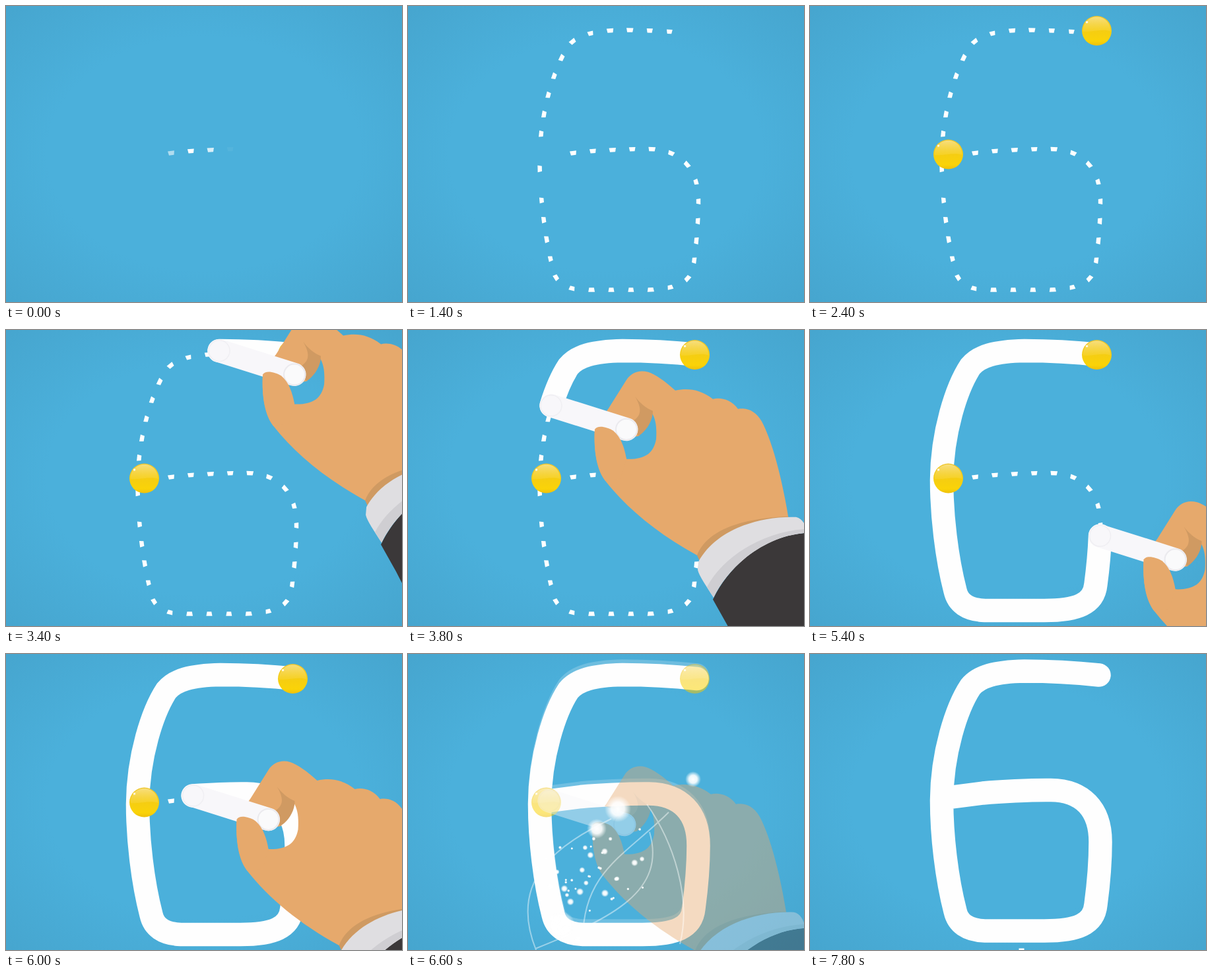
Write an HTML page that moves like this. It is 600 by 449 pixels and loops after 8000 ms.

```html
<!DOCTYPE html>
<html lang="en">
<head>
<meta charset="utf-8">
<title>Drawing the number six</title>
<style>
  html, body { margin: 0; width: 100%; height: 100%; overflow: hidden; background: #4aafd9; }
  svg { display: block; width: 100%; height: 100%; }
</style>
</head>
<body>
<svg viewBox="0 0 600 449" preserveAspectRatio="none">
  <defs>
    <radialGradient id="sky" cx=".5" cy=".5" r=".72">
      <stop offset=".55" stop-color="#4bb0db"/>
      <stop offset="1" stop-color="#46a5ce"/>
    </radialGradient>
    <linearGradient id="gold" x2="0" y2="1">
      <stop offset="0" stop-color="#eec52c"/>
      <stop offset=".5" stop-color="#f5cd12"/>
      <stop offset=".85" stop-color="#fad308"/>
      <stop offset="1" stop-color="#eec00c"/>
    </linearGradient>
    <linearGradient id="shine" x2="0" y2="1">
      <stop offset="0" stop-color="#fff3c0" stop-opacity=".55"/>
      <stop offset="1" stop-color="#fbe26a" stop-opacity=".2"/>
    </linearGradient>
    <radialGradient id="glow">
      <stop offset="0" stop-color="#fff"/>
      <stop offset=".5" stop-color="#fff" stop-opacity=".9"/>
      <stop offset="1" stop-color="#fff" stop-opacity="0"/>
    </radialGradient>
    <path id="six" d="M438 32C400 28 360 26 325 26C280 27 256 34 243 50C222 82 200 150 199.500 222C199.500 275 207 340 220 390C224 408 238 419 265 420L355 420C405 420 430 410 433 380C437 350 440 315 440 285C440 235 412 207 365 206.500C335 206 285 209 262 211L200 219"/>
    <g id="ball">
      <circle r="22.500" fill="url(#gold)"/>
      <path d="M-21 1C-21 -13 -11 -21 0 -21S21 -13 21 1C10 -4 -8 3 -21 1Z" fill="url(#shine)"/>
      <circle cx="-15" cy="-13" r="1.800" fill="#fff" opacity=".8"/>
    </g>
  </defs>

  <rect width="600" height="449" fill="url(#sky)"/>
  <g id="dashes" fill="#fff" transform="translate(0 10.500)"></g>
  <g fill="none" stroke="#fefefe" stroke-width="35.500" stroke-linecap="round" stroke-linejoin="round">
    <use id="finished" href="#six"/>
    <use id="drawn" href="#six" y="5.500"/>
  </g>
  <g id="balls"></g>

  <g id="hand">
    <path fill="#3b3839" d="M462 408C487 355 540 311 602 307L800 330V850H690L485 449Z"/>
    <path fill="#e6a96c" fill-rule="evenodd" d="M283 148C281 190 288 214 299 228C332 270 378 308 438 341L500 345L577 288C568 230 553 170 536 138C526 121 513 117 500 119C490 105 474 101 462 104C443 89 424 87 405 91C390 77 374 66 364 63C350 59 338 64 331 75L304 118ZM331 195C358 196 372 187 376 165C377 148 376 135 369 124L350 160L322 165Z"/>
    <path fill="#d09a62" d="M344 100C350 109 361 118 371 122C371 140 358 155 349 160L336 140C352 132 357 122 344 100Z"/>
    <path fill="#cf9a62" d="M438 341C452 305 500 285 576 282L580 292L500 306L443 352Z"/>
    <path fill="#dfdee1" d="M440 351C466 303 530 281 588 283C597 285 603 294 605 307C548 310 490 350 463 405C452 388 441 372 439 363Z"/>
    <path fill="#cfced2" d="M453 389C478 342 540 304 604 301L605 307C548 310 490 350 463 405Z"/>
    <path d="M217 114L331 150" stroke="#f8f7fa" stroke-width="35" stroke-linecap="round"/>
    <circle cx="217" cy="114" r="16" fill="none" stroke="#f0eff3" stroke-width="1.500"/>
    <circle cx="331" cy="150" r="16" fill="#fafafb" stroke="#ebeaee" stroke-width="2"/>
    <path fill="#e6a96c" d="M283 150C287 143 301 146 311 152C322 161 328 177 331 195L322 225L299 228C287 211 281 185 283 150Z"/>
  </g>

  <g id="sparkles">
    <g fill="none" stroke="#fff" stroke-width="2" opacity=".45">
      <path d="M308 250C230 288 150 340 194 449"/>
      <path d="M395 240C330 305 265 330 265 432"/>
      <path d="M362 228C402 285 430 370 412 440"/>
      <path d="M193 447C310 400 392 360 366 270"/>
    </g>
    <g id="sparks" fill="url(#glow)"></g>
  </g>
  <rect id="mark" x="316.500" y="446.500" width="8" height="3" fill="#fff"/>
</svg>
<script>
const LOOP = 8000, STEP = 200;
const SPEED = 0.3775, DRAW_START = 3095;
const NS = "http://www.w3.org/2000/svg";

const byId = id => document.getElementById(id);
const clamp = v => Math.max(0, Math.min(1, v));
const ramp = (t, from, to) => clamp((t - from) / (to - from));
const easeOut = v => 1 - (1 - v) ** 3;
const fade = (node, v) => node.setAttribute("opacity", v.toFixed(3));
const move = (node, x, y, extra = "") =>
  node.setAttribute("transform", `translate(${x} ${y}) ${extra}`);

function add(parent, tag, attrs) {
  const node = document.createElementNS(NS, tag);
  for (const key in attrs) node.setAttribute(key, attrs[key]);
  return byId(parent).appendChild(node);
}

let seed = 17;
const random = () => (seed = seed * 16807 % 2147483647) / 2147483647;
const scatter = range => (random() + random() - 1) * range;

const six = byId("six"), drawn = byId("drawn"), hand = byId("hand");
const total = six.getTotalLength();

function makeDash(at) {
  const { x, y } = six.getPointAtLength(at);
  const ahead = six.getPointAtLength(at + 1);
  const angle = Math.atan2(ahead.y - y, ahead.x - x) * 180 / Math.PI;
  const outer = 4.4 + random(), inner = outer - 1.2;
  const node = add("dashes", "path", { d: `M${-inner} -3.2H${inner}L${outer} 3.2H${-outer}Z` });
  move(node, x, y, `rotate(${angle})`);
  return { node, distance: Math.hypot(x - 285, y - 212) };
}

// Evenly spaced runs along the path, with a single dash below the left ball
const run = (start, gap, count) => Array.from({ length: count }, (_, i) => makeDash(start + i * gap));
const dashes = [...run(42, 30, 11), ...run(395, 0, 1), ...run(443, 29.87, 24)];

const makeSpark = (x, y, r) => ({ x, y, node: add("sparks", "circle", { r }) });
const sparks = [
  makeSpark(432, 190, 12), makeSpark(318, 235, 20),
  makeSpark(286, 265, 15), makeSpark(232, 411, 21),
  ...Array.from({ length: 42 }, () =>
    makeSpark(275 + scatter(95), 350 + scatter(110), 2 + random() ** 2 * 4))
];

const makeBall = (x, y, start) => ({ x, y, start, node: add("balls", "use", { href: "#ball" }) });
const balls = [makeBall(434.5, 37.5, 1400), makeBall(209.5, 225, 1600)];

function drawHand(t, length) {
  const tip = six.getPointAtLength(Math.min(length, total - 14));
  const away = 1 - easeOut(ramp(t, 2400, 3050));
  move(hand, tip.x - 217 + away * 230, tip.y + 5.5 - 114 + away * 300);
  fade(hand, t < 2600 ? 0 : 1 - ramp(t, 6400, 6740));
}

function drawSparkles(t) {
  fade(byId("sparkles"), ramp(t, 6200, 6550) * (1 - ramp(t, 6650, 7250)));
  const spread = 1 + (t - 6600) / 1600;
  for (const { node, x, y } of sparks) {
    move(node, 290 + (x - 290) * spread, 335 + (y - 335) * spread);
  }
}

function render(t) {
  const reach = 57 + t * 0.22;
  for (const { node, distance } of dashes) fade(node, clamp((reach - distance) / 40));
  fade(byId("dashes"), t > 6400 ? 0 : 1);

  for (const { node, x, y, start } of balls) {
    const grown = easeOut(ramp(t, start, start + 500));
    move(node, x, y, `scale(${0.5 + grown / 2})`);
    fade(node, grown);
  }
  fade(byId("balls"), 1 - ramp(t, 6400, 6840));

  const length = Math.max(0, Math.min(total, (t - DRAW_START) * SPEED));
  drawn.setAttribute("stroke-dasharray", `${length} ${total + 100}`);
  fade(drawn, length > 0 ? 1 - ramp(t, 6700, 7600) : 0);
  fade(byId("finished"), ramp(t, 6450, 7200));

  drawHand(t, length);
  drawSparkles(t);
  fade(byId("mark"), t >= 7200 ? 1 : 0);
}

const origin = performance.now();
function tick() {
  const t = (performance.now() - origin) % LOOP;
  render(Math.floor(t / STEP) * STEP);
  requestAnimationFrame(tick);
}
tick();
</script>
</body>
</html>
```
